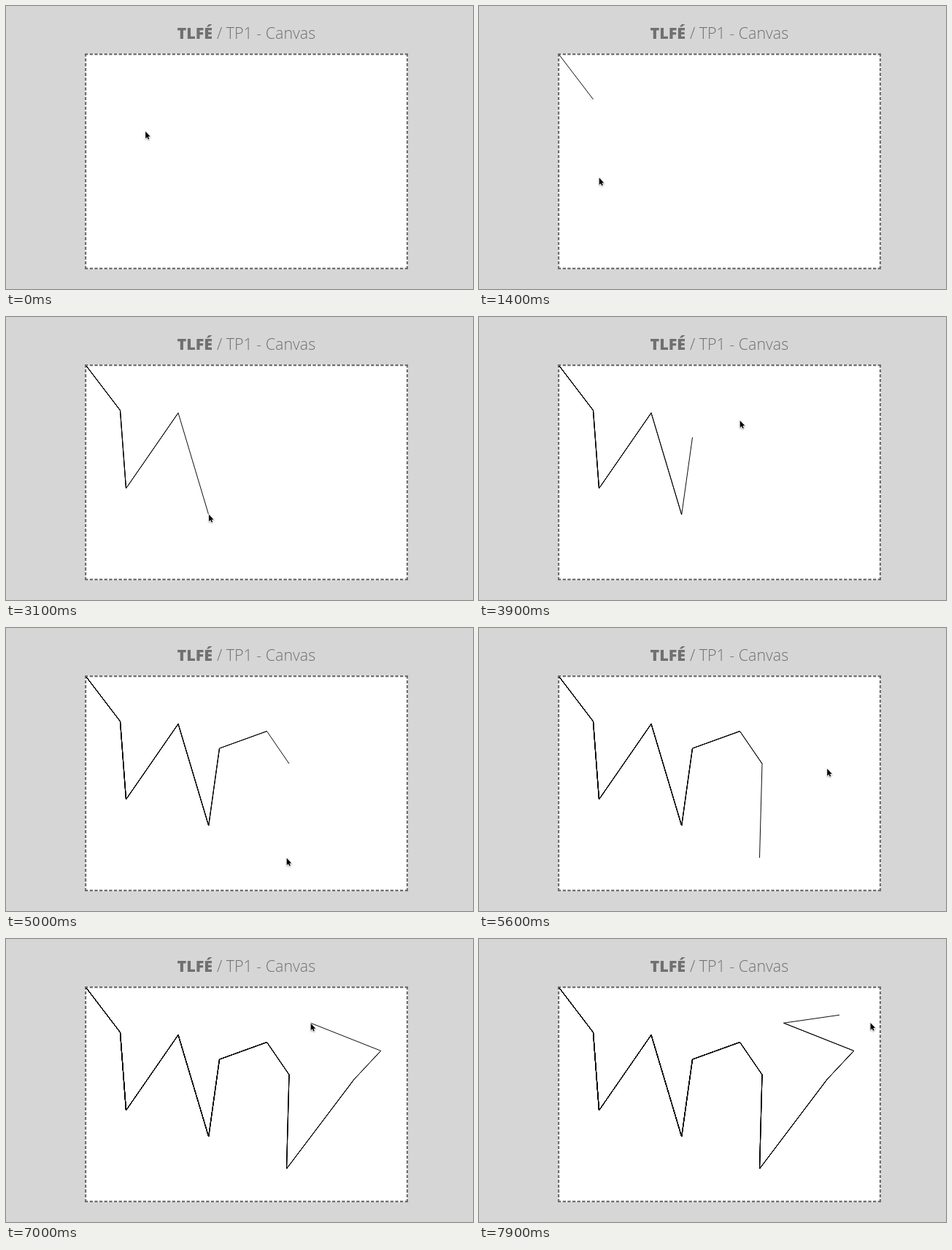
Animation of 640x388 px, one loop 8000 ms. Source, as an HTML page with a canvas:

```html
<!DOCTYPE html>
<html lang="fr">
<head>
<meta charset="utf-8">
<title>TP1 - Canvas</title>
<style>
  html, body { margin: 0; width: 100%; height: 100%; overflow: hidden; background: #d6d6d6; }
  canvas { display: block; width: 640px; height: 388px; }
</style>
</head>
<body>
<canvas width="640" height="388"></canvas>
<script>
const ctx = document.querySelector('canvas').getContext('2d');
const LOOP = 8000, STEP = 100;
const HOLD = 150, DWELL = 80, SETTLE = 140;
const GREY = '#707070';

const start = [191, 171.5], exit = [536.3, 114.5], origin = [110, 67];
const clicks = [
  [156.5, 128], [164.5, 235], [236, 131.5], [277.7, 271], [292.5, 165], [357.5, 141.5],
  [388, 186], [384.5, 315], [477, 192.5], [513.7, 153.3], [417.5, 115.2], [494, 104.2]
];
const stops = [...clicks, exit];

// The first clicks come slowly, the rest at a quicker steady pace
const pressTime = i => 690 + 800 * Math.min(i, 2) + 570 * Math.max(i - 2, 0);
const releaseTime = i => pressTime(i) + HOLD;

const clamp01 = p => Math.min(1, Math.max(0, p));
const ease = p => p * p * (3 - 2 * p);

// Between clicks the pointer rests, glides to the next stop and settles
function pointerAt(t) {
  let [x, y] = start;
  stops.forEach(([toX, toY], i) => {
    const leave = i ? releaseTime(i - 1) + DWELL : 0;
    const arrive = pressTime(i) - SETTLE;
    const p = ease(clamp01((t - leave) / (arrive - leave)));
    x += (toX - x) * p;
    y += (toY - y) * p;
  });
  return [x, y];
}

function dashedLine(x1, y1, x2, y2) {
  const dash = 4.4, length = Math.hypot(x2 - x1, y2 - y1);
  const count = Math.round(length / (dash * 1.5));
  ctx.setLineDash([dash, (length - count * dash) / (count - 1)]);
  ctx.beginPath();
  ctx.moveTo(x1, y1);
  ctx.lineTo(x2, y2);
  ctx.stroke();
  ctx.setLineDash([]);
}

function drawPage() {
  ctx.fillStyle = '#d6d6d6';
  ctx.fillRect(0, 0, 640, 388);
  ctx.fillStyle = GREY;
  ctx.font = '800 21.5px "Open Sans", sans-serif';
  ctx.fillText('TLFÉ', 234.5, 45);
  ctx.font = '350 21.4px "Open Sans", sans-serif';
  ctx.fillText('/ TP1 - Canvas', 289, 45);

  const left = 108, top = 65, right = 551, bottom = 361, inset = 1.1;
  ctx.fillStyle = '#fff';
  ctx.fillRect(left, top, right - left, bottom - top);
  ctx.strokeStyle = GREY;
  ctx.lineWidth = 2 * inset;
  for (const y of [top + inset, bottom - inset]) dashedLine(left, y, right, y);
  for (const x of [left + inset, right - inset]) dashedLine(x, top, x, bottom);
}

// The whole path is stroked again at every click, so older segments get darker
function drawPath(t) {
  ctx.strokeStyle = '#000';
  ctx.lineWidth = 0.95;
  ctx.beginPath();
  ctx.moveTo(...origin);
  clicks.forEach((point, i) => {
    if (t < releaseTime(i)) return;
    ctx.lineTo(...point);
    ctx.stroke();
  });
}

function drawRing(t) {
  const point = clicks.find((_, i) => t >= pressTime(i) && t < releaseTime(i));
  if (!point) return;
  ctx.strokeStyle = 'rgba(0, 0, 0, .75)';
  ctx.lineWidth = 1.5;
  ctx.beginPath();
  ctx.arc(...point, 15.5, 0, 2 * Math.PI);
  ctx.stroke();
}

const arrow = new Path2D('M0 0V11.6L2.6 9.2L4.3 13.1L6.2 12.3L4.5 8.5H8Z');

function drawPointer(x, y) {
  ctx.save();
  ctx.translate(x + 0.2, y + 0.5);
  ctx.scale(0.83, 0.83);
  ctx.shadowColor = 'rgba(0, 0, 0, .35)';
  ctx.shadowBlur = 2;
  ctx.shadowOffsetY = 1;
  ctx.strokeStyle = '#fff';
  ctx.lineWidth = 1.4;
  ctx.stroke(arrow);
  ctx.shadowColor = 'transparent';
  ctx.fillStyle = '#000';
  ctx.fill(arrow);
  ctx.restore();
}

function draw() {
  const t = Math.floor(performance.now() % LOOP / STEP) * STEP;
  drawPage();
  drawPath(t);
  drawRing(t);
  drawPointer(...pointerAt(t));
  requestAnimationFrame(draw);
}
draw();
</script>
</body>
</html>
```
